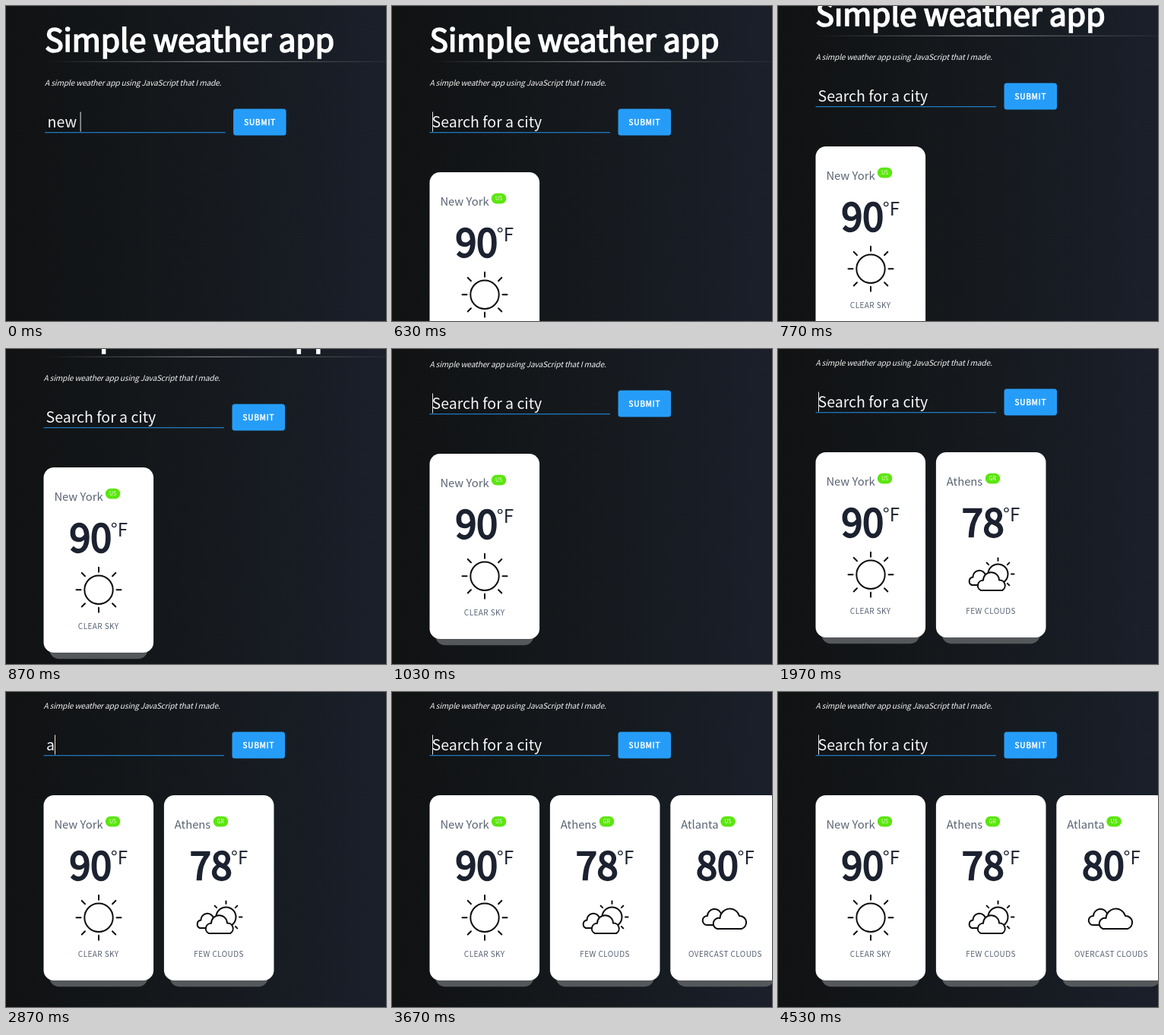
These frames come from a looping animation (500x415 px, 4610 ms). An HTML page:

```html
<!DOCTYPE html>
<html lang="en">
<head>
<meta charset="utf-8">
<title>Simple weather app</title>
<style>
  html, body { margin: 0; width: 100%; height: 100%; overflow: hidden; background: #14181c; }
  svg { display: block; width: 500px; height: 415px; }
  text {
    font-family: "Noto Sans CJK JP", "Noto Sans CJK SC", "Noto Sans CJK", sans-serif;
    white-space: pre;
    fill: #fff;
  }
  .title { font-size: 40.9px; stroke: #fff; stroke-width: 1.7px; }
  .intro { font-size: 10.2px; font-style: italic; letter-spacing: -.19px; fill: #f0f1f2; }
  .field { font-size: 19.5px; fill: #f6f7f8; }
  .submit { font-size: 10px; letter-spacing: .85px; stroke: #fff; stroke-width: .5px; }
  .city { font-size: 14.8px; fill: #5b6474; }
  .code { font-size: 7px; fill: #e9fbdc; }
  .temp { font-size: 50px; fill: #1c2230; stroke: #1c2230; stroke-width: 2.3px; }
  .unit { font-size: 24.2px; fill: #1c2230; }
  .sky { font-size: 10px; letter-spacing: .42px; fill: #566071; }
  .submit, .code, .sky { text-anchor: middle; }
  .icon { fill: #fff; stroke: #0c0d10; stroke-width: 2px; stroke-linecap: round; stroke-linejoin: round; }
</style>
</head>
<body>
<svg viewBox="0 0 500 415">
  <defs>
    <linearGradient id="bg">
      <stop offset="0" stop-color="#101213"/>
      <stop offset=".5" stop-color="#15191d"/>
      <stop offset="1" stop-color="#1a1f2a"/>
    </linearGradient>
    <linearGradient id="rule">
      <stop offset="0" stop-color="#a0a2a3" stop-opacity="0"/>
      <stop offset=".5" stop-color="#a0a2a3"/>
      <stop offset="1" stop-color="#a0a2a3" stop-opacity=".1"/>
    </linearGradient>
  </defs>
  <rect width="500" height="415" fill="url(#bg)"/>
  <g id="page">
    <text class="title" x="49.6" y="60.2">Simple weather app</text>
    <rect x="49.5" y="72.8" width="450.5" height=".9" fill="url(#rule)"/>
    <text class="intro" x="49.5" y="104.5">A simple weather app using JavaScript that I made.</text>
    <text class="field" id="field" y="159.6"></text>
    <rect x="49.5" y="166.2" width="237.5" height="1" fill="#2493e8"/>
    <rect id="caret" y="139.5" width="1" height="26" fill="#e4e6e8"/>
    <rect x="297.5" y="135.5" width="69.5" height="35" rx="3.5" fill="#259df8"/>
    <text class="submit" x="332.5" y="157">SUBMIT</text>
    <g id="cards"></g>
  </g>
</svg>
<script>
const LOOP = 4610, BLINK = 200, SCROLL = 83;
const $ = id => document.getElementById(id);

// [time, text in the field]; an empty text shows the placeholder
const typing = [
  [0, "new "], [30, "new y"], [60, "new yor"], [100, "new york"], [130, ""],
  [1330, "a"], [1400, "at"], [1430, "ath"], [1470, "athe"], [1500, "athen"], [1530, "athens"], [1570, ""],
  [2870, "a"], [2970, "at"], [3030, "atl"], [3070, "atla"], [3100, "atlan"], [3170, "atlanta"], [3270, ""]
];

function rays(cx, cy, from, to, angles, extra = 0) {
  return angles.map(a => {
    const r = a * Math.PI / 180, e = a % 90 ? extra : 0;
    const point = d => `${cx + (d + e) * Math.cos(r)} ${cy + (d + e) * Math.sin(r)}`;
    return `<path d="M${point(from)}L${point(to)}"/>`;
  }).join("");
}

const icons = {
  sun: `<circle cx="122" cy="297.2" r="18.7"/>` +
    rays(122, 297.2, 23.5, 29.5, [0, 45, 90, 135, 180, 225, 270, 315], 2),
  few: `<circle cx="289.5" cy="296.5" r="13"/>` +
    rays(289.5, 296.5, 17.5, 21, [-135, -90, -45, 0, 45]) +
    `<path d="M270 311H255A5.5 5.5 0 0 1 256.5 300.5A8.4 8.4 0 0 1 273 298Z"/>
     <path d="M267 318H295A7.2 7.2 0 0 0 291 304.5A10.5 10.5 0 0 0 270 304.8A6.9 6.9 0 0 0 267 318Z"/>`,
  overcast: `<path d="M430 307H414.5A6 6 0 0 1 415 295A9.3 9.3 0 0 1 433 292Z"/>
     <path d="M427.5 312H460A8.7 8.7 0 0 0 457 295A13 13 0 0 0 431.5 298A7.3 7.3 0 0 0 427.5 312Z"/>`
};

const cities = [
  { name: "New York", code: "US", badge: 81.3, temp: 90, sky: "CLEAR SKY", icon: "sun", at: 230, drawn: 260 },
  { name: "Athens", code: "GR", badge: 64.8, temp: 78, sky: "FEW CLOUDS", icon: "few", at: 1600, drawn: 1630 },
  { name: "Atlanta", code: "US", badge: 66, temp: 80, sky: "OVERCAST CLOUDS", icon: "overcast", at: 3370, drawn: 3400 }
];

function card(c, i) {
  const x = 49.5 + 158.4 * i;
  return `<g>
    <rect x="${x + 7.4}" y="420" width="129.8" height="51.2" rx="13" fill="#55585b"/>
    <rect x="${x}" y="219" width="144.6" height="244" rx="13.5" fill="#fff"/>
    <text class="city" x="${x + 13.9}" y="262.6">${c.name}</text>
    <rect x="${x + c.badge}" y="246.8" width="19.5" height="13.6" rx="6.8" fill="#5be60e"/>
    <text class="code" x="${x + c.badge + 9.75}" y="256.2">${c.code}</text>
    <text class="temp" x="${x + 34}" y="329.7">${c.temp}</text>
    <text class="unit" x="${x + 88.2}" y="310.4">°F</text>
    <g class="icon" transform="translate(0 83)">${icons[c.icon]}</g>
    <text class="sky" x="${x + 72.2}" y="432.1">${c.sky}</text>
  </g>`;
}

$("cards").innerHTML = cities.map(card).join("");
const cards = [...$("cards").children];
const field = $("field"), caret = $("caret");
const show = (el, on) => el.setAttribute("visibility", on ? "inherit" : "hidden");

function scrollAt(t) {
  if (t < 700) return 0;
  const step = 700 + Math.floor((t - 700) / 33.3) * 33.3;
  const p = Math.min(1, (step - 690) / 410);
  return Math.round(SCROLL * (1 - (1 - p) ** 2.5));
}

let shown = null;
function draw(t) {
  const [since, text] = typing.findLast(s => s[0] <= t);
  if (text !== shown) {
    field.textContent = text || "Search for a city";
    field.setAttribute("x", text ? 53 : 52.6);
    caret.setAttribute("x", 53 + (text ? Math.round(field.getComputedTextLength()) : 0));
    shown = text;
  }
  show(caret, Math.floor((t - since) / BLINK) % 2 === 0);
  cities.forEach((c, i) => {
    show(cards[i], t >= c.at);
    show(cards[i].querySelector(".icon"), t >= c.drawn);
  });
  // the scrollbar nudges the page once the first card makes it taller
  const shift = t < cities[0].at ? 1.6 : 0;
  $("page").setAttribute("transform", `translate(${shift} ${-scrollAt(t)})`);
}

function tick() {
  draw(performance.now() % LOOP);
  requestAnimationFrame(tick);
}
tick();
</script>
</body>
</html>
```
